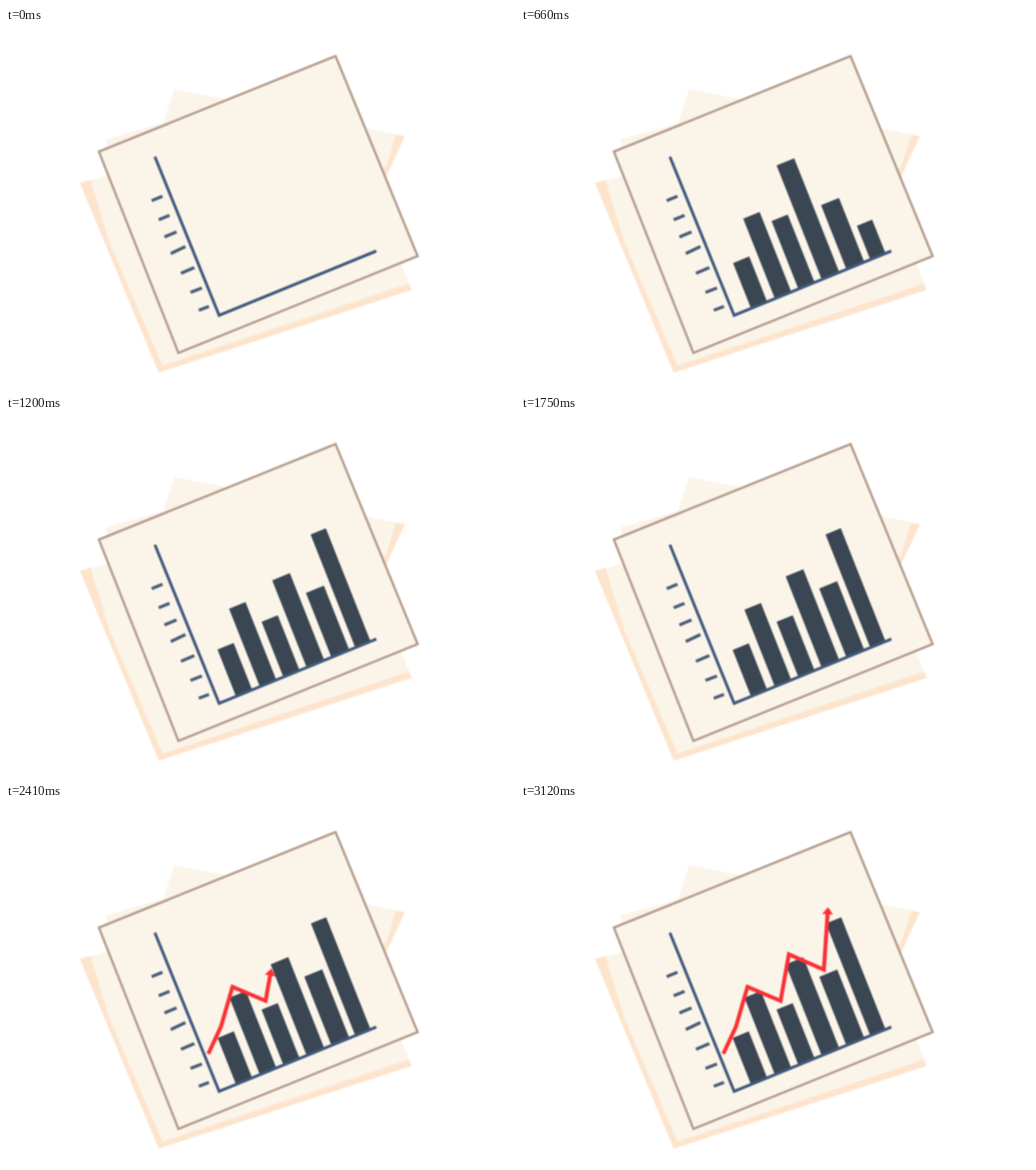
Recreate the animation shown at these times as an HTML page. Size 800 by 565 pixels, loop 3160 ms.

```html
<!DOCTYPE html>
<html lang="en">
<head>
<meta charset="utf-8">
<title>Growing bar chart</title>
<style>
  html, body { margin: 0; width: 100%; height: 100%; overflow: hidden; background: #fff; }
  svg { display: block; width: 800px; height: 565px; }
  .cream { fill: #fbf4e9; }
  .peach { fill: #fde4cd; }
  .sheet { fill: #fbf4e9; stroke: #b39a8a; stroke-width: 3.6; }
  .ink { fill: none; stroke: #3f587c; stroke-width: 4.6; }
  .ticks { stroke: #485c76; stroke-width: 5; }
  .bars { fill: #3a4652; stroke: #3a4652; stroke-width: 1.4; }
  .trend { fill: none; stroke: #fb2f33; stroke-width: 6.2; stroke-linejoin: miter; }
  .head { fill: #fb2f33; }
  .soft { filter: blur(1px); }
</style>
</head>
<body>
<svg viewBox="0 0 800 565">
  <g class="soft">
    <path class="cream" d="M264 96L342 111L400 160L240 172Z"/>
    <path class="cream" d="M156 175L247 149L260 190L162 196Z"/>
    <path class="peach" d="M560 157L627 170L597 234L570 230Z"/>
    <path class="cream" d="M560 156L613 167L597 220L570 220Z"/>
    <path class="peach" d="M116 243L134 238L620 385L634 402L638 411L240 541Z"/>
    <path class="cream" d="M133 239L160 232L400 300L621 370L634 401L246 530L162 335Z"/>
    <path class="sheet" d="M146 194L518 44L647 358L271 510Z"/>
    <path class="ink ticks" d="M229 271L246 264M240 301L257 294M249 328L268 320M259 354L282 343M275 385L296 376M290 415L308 408M303 443L319 437"/>
    <g class="bars" id="bars" transform="translate(334.3 451) rotate(-22.2) skewX(-.6)"></g>
    <path class="ink" d="M234 202L335 451L582 350"/>
    <path class="trend" id="trend"/>
    <path class="head" id="head" d="M-2 -8.5L9 0L-2 8.5Z"/>
  </g>
</svg>
<script>
const LOOP = 3160, GROW = 250;

// left, width, height, start (ms), overshoot
const bars = [
  [30, 26, 77.5, 16, .69],
  [70.5, 26.5, 129, 72, .76],
  [110.5, 26, 92.5, 223, .55],
  [150, 28.5, 153, 357, .69],
  [192, 29, 115, 433, .69],
  [232.5, 24.5, 188.5, 592, .56]
];
const line = [[318, 392], [338, 349], [356, 287], [408, 309], [421, 236], [476, 260], [482, 171]];
const lineStart = 1760, lineEnd = 2980;

const trend = document.getElementById("trend");
const head = document.getElementById("head");
const group = document.getElementById("bars");

const rects = bars.map(([x, width]) => {
  const rect = document.createElementNS("http://www.w3.org/2000/svg", "rect");
  rect.setAttribute("x", x);
  rect.setAttribute("width", width);
  group.append(rect);
  return rect;
});

const lengths = line.slice(1).map(([x, y], i) => Math.hypot(x - line[i][0], y - line[i][1]));
const total = lengths.reduce((a, b) => a + b);

// Linear growth, then a decaying swing around full height.
function spring(ms, amp) {
  if (ms <= 0) return 0;
  if (ms < GROW) return ms / GROW;
  const s = (ms - GROW) / 1000;
  return 1 + amp * Math.exp(-4.5 * s) * Math.sin(Math.PI * s / .375);
}

function drawTrend(t) {
  const show = t > lineStart;
  trend.style.display = head.style.display = show ? "" : "none";
  if (!show) return;
  let left = total * Math.min(1, (t - lineStart) / (lineEnd - lineStart));
  let i = 0;
  while (i < lengths.length - 1 && left > lengths[i]) left -= lengths[i++];
  const [x0, y0] = line[i], [x1, y1] = line[i + 1];
  const k = Math.min(1, left / lengths[i]);
  const x = x0 + (x1 - x0) * k, y = y0 + (y1 - y0) * k;
  const angle = Math.atan2(y1 - y0, x1 - x0) * 180 / Math.PI;
  trend.setAttribute("d", "M" + [...line.slice(0, i + 1), [x, y]].join("L"));
  head.setAttribute("transform", `translate(${x} ${y}) rotate(${angle})`);
}

function draw(t) {
  bars.forEach(([, , height, start, amp], i) => {
    const h = height * spring(t - start, amp);
    rects[i].setAttribute("y", -h);
    rects[i].setAttribute("height", h);
  });
  drawTrend(t);
}

// Hold each pose for one step at 24 steps a second.
function stepTime(ms) {
  const c = Math.floor(ms / 10);
  return (Math.ceil(6 * (c + 1) / 25) - 1) * 1000 / 24;
}

const origin = performance.now();
function tick() {
  draw(stepTime((performance.now() - origin) % LOOP));
  requestAnimationFrame(tick);
}
draw(0);
requestAnimationFrame(tick);
</script>
</body>
</html>
```
